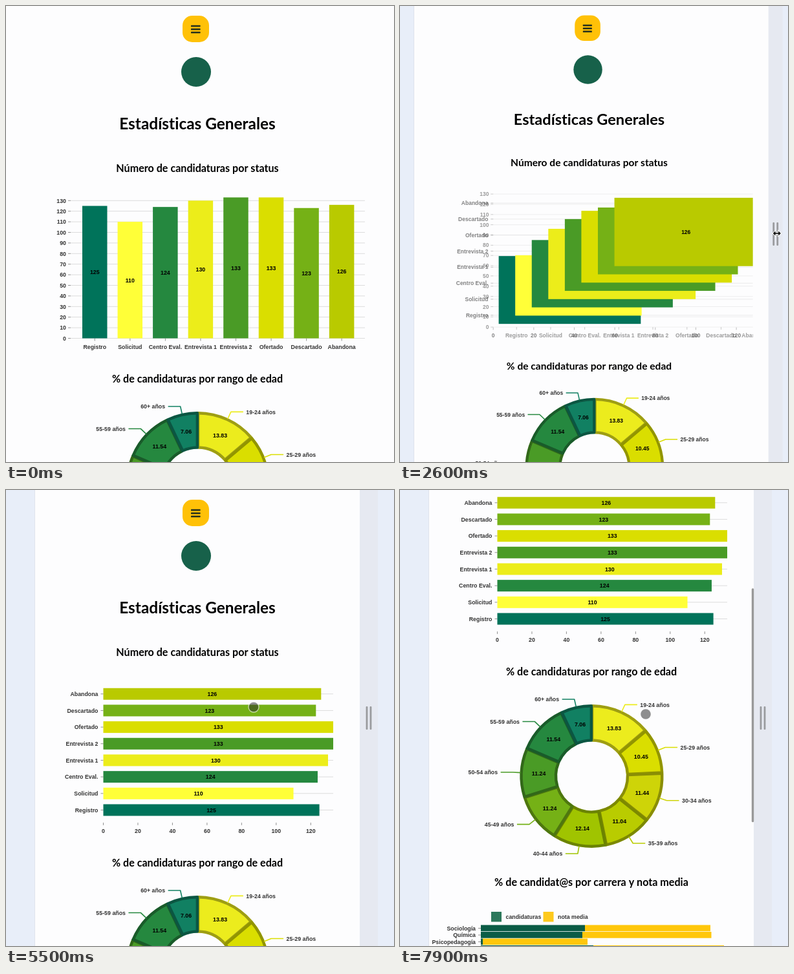
These frames come from a looping animation (600 px wide and 706 px high, 8000 ms). An HTML page with a canvas:

```html
<!DOCTYPE html>
<html lang="es">
<head>
<meta charset="utf-8">
<title>Estadísticas</title>
<style>
html, body { margin: 0; width: 100%; height: 100%; overflow: hidden; background: #e8eef9; }
canvas { display: block; width: 600px; height: 706px; }
</style>
</head>
<body>
<canvas id="stage"></canvas>
<script>
const W = 600, H = 706, LOOP = 8000, STEP = 100;
const canvas = document.getElementById('stage');
const ratio = window.devicePixelRatio || 1;
canvas.width = W * ratio;
canvas.height = H * ratio;
const c = canvas.getContext('2d');
c.letterSpacing = '0.01px'; // keeps "ti" from joining into a ligature

const LABEL = 'bold 8.8px "Liberation Sans", Arial, sans-serif';
const HEAD = 'bold 24.4px Lato, sans-serif';
const SUBHEAD = 'bold 16.1px Lato, sans-serif';
const INK = '#333', GRID = '#dcdcdc', TICK = '#777';

const status = [
  ['Registro', 125, '#00735a'], ['Solicitud', 110, '#ffff38'],
  ['Centro Eval.', 124, '#25883f'], ['Entrevista 1', 130, '#eced1a'],
  ['Entrevista 2', 133, '#4a9b26'], ['Ofertado', 133, '#dade00'],
  ['Descartado', 123, '#75b116'], ['Abandona', 126, '#b9ca00']
];
const ages = [
  ['19-24', 13.83, [236, 236, 29]], ['25-29', 10.45, [218, 222, 0]],
  ['30-34', 11.44, [206, 212, 8]], ['35-39', 11.04, [185, 204, 0]],
  ['40-44', 12.14, [160, 196, 0]], ['45-49', 11.24, [117, 177, 22]],
  ['50-54', 11.24, [74, 155, 38]], ['55-59', 11.54, [37, 136, 63]],
  ['60+', 7.06, [17, 128, 98]]
];
const degrees = [
  ['Sociología', 286, 480], ['Química', 282, 481.5],
  ['Psicopedagogía', 128, 290], ['Periodismo', 299, 501]
];

// time, page left, page right, content centre, zoom, handle x, pointer offset
const pageTrack = [
  [1900, -10, 602, 296, 1, 614, -4],
  [2000, -4, 596, 301, 1, 607, -4],
  [2100, 1, 590, 306.5, .999, 600, -4],
  [2300, 10, 581, 300, .985, 592, 1],
  [2700, 26, 566, 290, .96, 577, 2.5],
  [3200, 38, 553, 283.5, .945, 564.5, 2.5],
  [3700, 45, 547, 295.5, .999, 561, 3],
  [4400, 45, 547, 295.5, .999, 561, 3],
  [4600, 45, 547, 296, 1, 561, 3]
];
// time, axis x, pixels per unit, turn from columns to rows, ring centre
const chartTrack = [
  [2000, 100, 3.3, 0, 296.5],
  [2100, 100, 3.3, .024, 296.5],
  [2300, 142.5, 3.25, .2, 301],
  [2700, 142.5, 3.24, .62, 306],
  [3200, 142.5, 3.235, .873, 312.5],
  [3700, 150.5, 2.8, .975, 296.5],
  [4100, 150.5, 2.767, .993, 296.5],
  [4500, 150.5, 2.673, 1, 296.5]
];
const scrollTrack = [[5700, 0], [6000, 25], [6500, 118], [7200, 214], [7900, 296]];
const touchTrack = [[4700, 548, 351], [5000, 460, 342], [5400, 383, 336], [5700, 383, 336], [6300, 380, 347]];

function at(track, t) {
  if (t <= track[0][0]) return track[0].slice(1);
  const i = track.findIndex(row => row[0] > t);
  if (i < 0) return track[track.length - 1].slice(1);
  const a = track[i - 1], b = track[i], k = (t - a[0]) / (b[0] - a[0]);
  return a.slice(1).map((v, n) => v + (b[n + 1] - v) * k);
}
const mix = (a, b, k) => a + (b - a) * k;
const rgb = (col, k = 1) => `rgb(${col.map(v => Math.round(v * k)).join()})`;

function box(x, y, w, h, fill) {
  c.fillStyle = fill;
  c.fillRect(x, y, w, h);
}
function pill(x, y, w, h, r, fill) {
  c.fillStyle = fill;
  c.beginPath();
  c.roundRect(x, y, w, h, r);
  c.fill();
}
function disc(x, y, r, fill) {
  c.fillStyle = fill;
  c.beginPath();
  c.arc(x, y, r, 0, Math.PI * 2);
  c.fill();
}
function path(points, stroke, width) {
  c.strokeStyle = stroke;
  c.lineWidth = width;
  c.beginPath();
  points.forEach(p => c.lineTo(p[0], p[1]));
  c.stroke();
}
function text(str, x, y, align = 'center', fill = INK, font = LABEL) {
  c.font = font;
  c.textAlign = align;
  c.fillStyle = fill;
  c.fillText(str, x, y);
}

function header() {
  pill(273, 15, 41, 41, 15, '#ffc107');
  for (let i = 0; i < 3; i++) pill(286, 29.7 + i * 5, 14.5, 2.6, .6, '#26301c');
  disc(294, 102, 23, '#17614a');
  text('Estadísticas Generales', 296, 190.5, 'center', '#000', HEAD);
  text('Número de candidaturas por status', 296, 256.5, 'center', '#000', SUBHEAD);
  text('% de candidaturas por rango de edad', 296, 582.8, 'center', '#000', SUBHEAD);
  text('% de candidat@s por carrera y nota media', 296, 908.8, 'center', '#000', SUBHEAD);
}

const BASE = 514.5, UNIT = 1.64, COL = 54.55;
const rowY = i => 495.5 - i * 25.68;

function columnAxes(x0) {
  for (let v = 0; v <= 130; v += 10) {
    const y = BASE - v * UNIT;
    path([[x0, y], [x0 + 455, y]], GRID, 1);
    path([[x0 - 4, y], [x0, y]], TICK, .8);
    text(v, x0 - 7, y + 3.2, 'right');
  }
  status.forEach(([name], i) => {
    const x = x0 + 37.3 + i * COL;
    path([[x, BASE], [x, BASE + 4]], TICK, .8);
    text(name, x, 531);
  });
}
function rowAxes(x0, unit) {
  status.forEach(([name], i) => {
    const y = rowY(i);
    path([[x0, y], [x0 + 133 * unit, y]], GRID, 1);
    path([[x0 - 4, y], [x0, y]], TICK, .8);
    text(name, x0 - 8, y + 3.2, 'right');
  });
  for (let v = 0; v <= 120; v += 20) {
    const x = x0 + v * unit;
    path([[x, 515], [x, 519]], TICK, .8);
    text(v, x, 531);
  }
}
function statusChart(x0, unit, turn) {
  c.save();
  c.beginPath();
  c.rect(0, 270, 558, 280);
  c.clip();
  const shown = Math.max(0, Math.min(1, (turn - .03) / .8));
  if (turn < .98) { c.globalAlpha = turn < .03 ? 1 : 1 - turn; columnAxes(x0); }
  if (shown) { c.globalAlpha = shown; rowAxes(x0, unit); }
  c.globalAlpha = 1;
  status.forEach(([, value, fill], i) => {
    const tall = value * UNIT;
    const x = mix(x0 + 18 + i * COL, x0, turn);
    const y = mix(BASE - tall, rowY(i) - 9, turn);
    const w = mix(38.5, value * unit, turn);
    const h = mix(tall, 18, turn);
    box(x, y, w, h, fill);
    text(value, x + w / 2, y + h / 2 + 3.2, 'center', '#000');
  });
  c.restore();
}

function ageRing(cx) {
  const cy = 739, total = ages.reduce((s, a) => s + a[1], 0);
  const polar = (a, r) => [cx + r * Math.cos(a), cy + r * Math.sin(a)];
  const pad = .006;
  let from = -Math.PI / 2;
  c.lineJoin = 'round';
  ages.forEach(([name, value, col]) => {
    const to = from + value / total * Math.PI * 2, mid = (from + to) / 2;
    c.beginPath();
    c.arc(cx, cy, 108.8, from + pad, to - pad);
    c.arc(cx, cy, 55.5, to - pad * 2, from + pad * 2, true);
    c.closePath();
    c.fillStyle = rgb(col);
    c.fill();
    c.strokeStyle = rgb(col, .67);
    c.lineWidth = 4.4;
    c.stroke();

    const [tx, ty] = polar(mid, 82);
    text(value.toFixed(2), tx, ty + 3.2, 'center', '#000');

    const side = Math.cos(mid) > 0 ? 1 : -1;
    const [ex, ey] = polar(mid, 122);
    path([polar(mid, 110), [ex, ey], [ex + side * 19, ey]], rgb(col), 1.6);
    text(name + ' años', ex + side * 23.5, ey + 3.2, side > 0 ? 'left' : 'right');
    from = to;
  });
}

function degreeChart() {
  box(141, 949, 16, 15.5, '#2c785b');
  text('candidaturas', 163.5, 960, 'left');
  box(221.5, 949, 16, 15.5, '#fec91d');
  text('nota media', 244, 960, 'left');
  degrees.forEach(([name, split, end], i) => {
    const y = 969.5 + i * 10.5;
    box(125, y, split - 125, 9.7, '#0b5c46');
    box(split, y, end - split, 9.7, '#ffc70b');
    path([[121, y + 5], [125, y + 5]], TICK, .8);
    text(name, 117, y + 8, 'right');
  });
}

function resizePointer(x, y) {
  const arrow = dir => {
    c.beginPath();
    c.moveTo(x + dir * 6, y);
    c.lineTo(x + dir * 2.4, y - 3.4);
    c.lineTo(x + dir * 2.4, y + 3.4);
    c.closePath();
  };
  for (const dir of [-1, 1]) {
    arrow(dir);
    c.strokeStyle = '#fff';
    c.lineWidth = 2;
    c.stroke();
  }
  box(x - 4, y - 1.8, 8, 3.6, '#fff');
  for (const dir of [-1, 1]) {
    arrow(dir);
    c.fillStyle = '#000';
    c.fill();
  }
  box(x - 3.5, y - .8, 7, 1.6, '#000');
}

function draw(t) {
  const [left, right, centre, zoom, handle, shift] = at(pageTrack, t);
  const [axis, unit, turn, ring] = at(chartTrack, t);
  const [scroll] = at(scrollTrack, t);
  c.setTransform(ratio, 0, 0, ratio, 0, 0);
  box(0, 0, W, H, '#e8eef9');
  box(right, 0, Math.max(22, 575 - right), H, '#e6e9f1');
  box(left - 1, 0, right - left + 1, H, '#dfe3ec');
  box(left, 0, right - left, H, '#fdfdfe');

  c.save();
  c.beginPath();
  c.rect(left, 0, right - left, H);
  c.clip();
  c.translate(centre, 0);
  c.scale(zoom, zoom);
  c.translate(-296, -scroll);
  header();
  statusChart(axis, unit, turn);
  ageRing(ring);
  degreeChart();
  c.restore();

  if ((t >= 3700 && t < 4400) || t >= 5700)
    pill(right - 3.2, scroll * .514, 3.4, 362, 1.5, '#999');
  for (const side of [-3, 3]) pill(handle + side - 1.4, 335, 2.8, 36, 1, '#9a9b9e');

  if (t >= 2000 && t < 4700) resizePointer(handle + shift, 352);
  if (t >= 4700) {
    const [x, y] = at(touchTrack, t);
    disc(x, y, 7.8, 'rgba(40,40,40,.52)');
    if (t < 5700) {
      c.strokeStyle = 'rgba(255,255,255,.6)';
      c.lineWidth = 1.4;
      c.beginPath();
      c.arc(x, y, 8, 0, Math.PI * 2);
      c.stroke();
    }
  }
}

const start = performance.now();
function tick() {
  const t = (performance.now() - start) % LOOP;
  draw(Math.floor(t / STEP) * STEP);
  requestAnimationFrame(tick);
}
tick();
</script>
</body>
</html>
```
